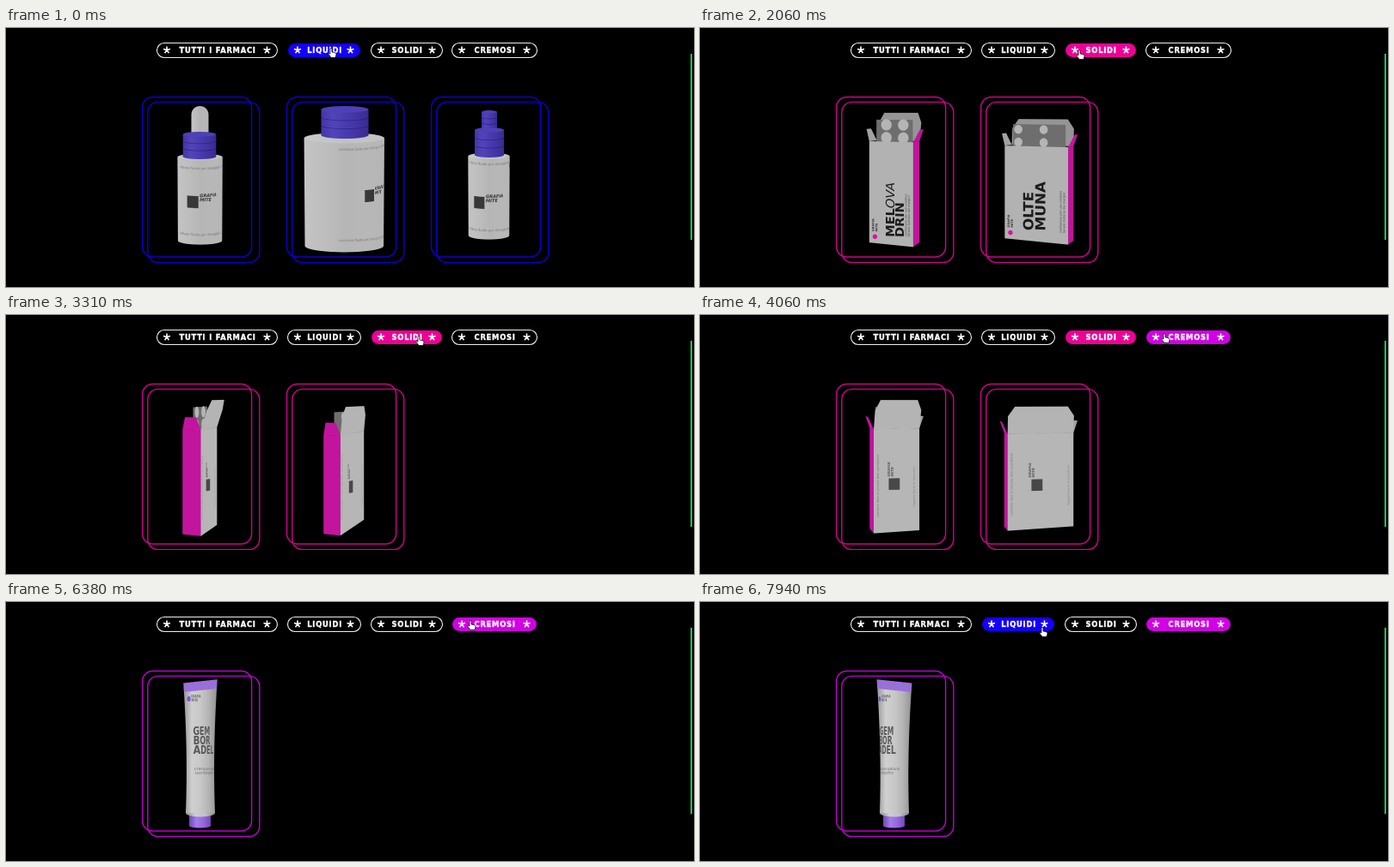
An HTML page with a canvas that plays this animation: 800 by 302 pixels, repeating every 8 s.

```html
<!DOCTYPE html>
<html lang="it">
<head>
<meta charset="utf-8">
<title>Farmaci</title>
<style>
  html, body { margin: 0; width: 100%; height: 100%; overflow: hidden; background: #000; }
  canvas, svg { position: absolute; left: 0; top: 0; width: 800px; height: 302px; }
  text { font: bold 8.4px "DejaVu Sans", sans-serif; letter-spacing: .75px; text-anchor: middle;
         fill: #fff; stroke: #fff; stroke-width: .35; }
</style>
</head>
<body>
<canvas width="1600" height="604"></canvas>
<svg viewBox="0 0 800 302"></svg>
<script>
const LOOP = 8000, STEP = 62.5, SPIN = Math.PI * .4 / 1000;
const SANS = '"DejaVu Sans", sans-serif';
const svg = document.querySelector('svg');
const ctx = document.querySelector('canvas').getContext('2d');

const tabs = [
  { name: 'TUTTI I FARMACI', x: 175.5, w: 140, color: '#fff' },
  { name: 'LIQUIDI', x: 327.5, w: 85, color: '#1400fa', line: '#0c00d2' },
  { name: 'SOLIDI', x: 424.5, w: 83, color: '#ee0096', line: '#d4008c' },
  { name: 'CREMOSI', x: 518.5, w: 99, color: '#d200e4', line: '#c000d2' }
];
// start time, selected tab, number of cards
const scenes = [[0, 1, 3], [1750, 2, 2], [5150, 3, 1]];
// time, x, y of the pointer tip
const pointerPath = [
  [0, 378, 24], [180, 378, 24], [810, 416, 25], [1250, 441, 26], [2500, 441, 26],
  [2900, 489, 25], [3310, 480, 25], [4050, 540, 22], [6650, 540, 22], [7700, 398, 30], [8000, 398, 30]
];

/* ---------- page chrome ---------- */

const star = (x, y) => {
  let d = '';
  for (let i = 0; i < 5; i++) {
    const a = i * Math.PI * .4;
    d += `M${x} ${y}l${4.2 * Math.sin(a)} ${-4.2 * Math.cos(a)}`;
  }
  return `<path d="${d}" stroke="#fff" stroke-width="1.6"/>`;
};
const tabMarkup = ({ name, x, w }) =>
  `<rect class="tab" x="${x}" y="17.5" width="${w}" height="17" rx="8.5" stroke-width="1.1"/>` +
  star(x + 11.5, 25.8) + star(x + w - 12, 25.8) +
  `<text x="${x + w / 2 + .6}" y="29">${name}</text>`;
const cardMarkup = i => `<g class="card" transform="translate(${168 * i})" fill="none" stroke-width="1.4">
  <rect x="158.6" y="80.5" width="127" height="186.5" rx="12"/>
  <rect x="164.8" y="86.4" width="130" height="187" rx="12"/></g>`;

svg.innerHTML = tabs.map(tabMarkup).join('') + [0, 1, 2].map(cardMarkup).join('') +
  `<rect x="796" y="30" width="1.7" height="217" fill="#24e266"/>
   <path id="pointer" fill="#fff" stroke="#000" stroke-width=".7"/>`;
const tabRects = svg.querySelectorAll('.tab');
const cards = svg.querySelectorAll('.card');
const pointer = svg.querySelector('#pointer');
const HAND = 'M-1 0Q0-1 1 0V4L5 5Q6 5 6 7L5 10.5H0L-3 6.5Q-3 5-1 6Z';
const ARROW = 'M0 0V8.4L2 6.6 3.4 9.6 4.8 9 3.4 6H6Z';

function pointerAt(t) {
  const i = pointerPath.findIndex(k => k[0] > t);
  const [t0, x0, y0] = pointerPath[i - 1], [t1, x1, y1] = pointerPath[i];
  const p = (t - t0) / (t1 - t0), e = p * p * (3 - 2 * p);
  return [x0 + (x1 - x0) * e, y0 + (y1 - y0) * e];
}

function drawChrome(t, selected, count) {
  const [px, py] = pointerAt(t);
  let over = false;
  tabs.forEach((tab, i) => {
    const hover = px > tab.x && px < tab.x + tab.w;
    const on = hover || i === selected;
    over = over || hover;
    tabRects[i].setAttribute('fill', on ? tab.color : '#000');
    tabRects[i].setAttribute('stroke', on ? '#000' : '#eee');
  });
  cards.forEach((card, i) => {
    card.setAttribute('visibility', i < count ? 'visible' : 'hidden');
    card.setAttribute('stroke', tabs[selected].line);
  });
  pointer.setAttribute('d', over ? HAND : ARROW);
  pointer.setAttribute('transform', `translate(${px} ${py})`);
}

/* ---------- shared drawing helpers ---------- */

function shade(cx, r, colors) {
  const g = ctx.createLinearGradient(cx - r, 0, cx + r, 0);
  colors.forEach((c, i) => g.addColorStop(i / (colors.length - 1), c));
  return g;
}
const GREY = ['#c4c4c4', '#bebebe', '#b6b6b6', '#b8b8b8', '#b6b6b6'];
const VIOLET = ['#4436a8', '#5244ba', '#4a3cb0', '#4234a2', '#382c92'];

function write(c, str, x, y, font, color) {
  c.font = `${font} ${SANS}`;
  c.fillStyle = color;
  c.fillText(str, x, y);
}
function writeUp(str, x, y, font, color) {
  ctx.save();
  ctx.translate(x, y);
  ctx.rotate(-Math.PI / 2);
  write(ctx, str, 0, 0, font, color);
  const w = ctx.measureText(str).width;
  ctx.restore();
  return w;
}
function dot(c, x, y, r, color) {
  c.beginPath();
  c.arc(x, y, r, 0, 7);
  c.fillStyle = color;
  c.fill();
}
function poly(points, fill) {
  ctx.beginPath();
  points.forEach(p => ctx.lineTo(...p));
  ctx.closePath();
  ctx.fillStyle = fill;
  ctx.fill();
}

/* ---------- bottles ---------- */

function cylinder(cx, y0, y1, r, k, colors, kTop = k, rEnd = r) {
  ctx.beginPath();
  ctx.ellipse(cx, y0, r, kTop, 0, Math.PI, Math.PI * 2);
  ctx.ellipse(cx, y1, rEnd, k, 0, 0, Math.PI);
  ctx.closePath();
  ctx.fillStyle = shade(cx, r, colors);
  ctx.fill();
}
function cap(cx, y0, y1, r, k) {
  cylinder(cx, y0, y1, r, k, VIOLET);
  ctx.beginPath();
  ctx.ellipse(cx, y0, r - .5, k - .4, 0, 0, 7);
  ctx.fillStyle = '#4e40b8';
  ctx.fill();
  ctx.strokeStyle = 'rgba(25,15,100,.6)';
  ctx.lineWidth = .7;
  for (const f of [.3, .62]) {
    ctx.beginPath();
    ctx.ellipse(cx, y0 + (y1 - y0) * f, r, k, 0, 0, Math.PI);
    ctx.stroke();
  }
}

const bottles = [
  { cx: 225.6, r: 26.2, y0: 150.5, y1: 248, k: 4, logo: [-.3, 203], ring: [165, 242], rows: ['ZEN', 'ORA', 'MIL'], rowY: 194, size: 15, dotY: 166,
    head() { cylinder(225.5, 101, 124, 10, 2, GREY, 10); cap(225, 124, 150, 19.3, 3); } },
  { cx: 393.3, r: 46.7, y0: 128.5, y1: 254, k: 6.5, logo: [.71, 197], ring: [143, 249], rows: ['FLE', 'NDA'], rowY: 194, size: 24, dotY: 160,
    head() { cap(394, 95, 125, 27.5, 4); } },
  { cx: 561.5, r: 24.2, y0: 149.5, y1: 242, k: 4, logo: [-.46, 204], ring: [160, 237], rows: ['KE', 'DUVO'], rowY: 203, size: 16, dotY: 163,
    head() { cap(562, 98, 118, 9, 2); cap(562, 119, 148, 17, 3); } }
];
const TEX = 3, LEAD = 1.5;

function makeLabel(b) {
  const tex = document.createElement('canvas');
  tex.width = Math.round(2 * Math.PI * b.r * TEX);
  tex.height = (b.y1 - b.y0) * TEX;
  const c = tex.getContext('2d');
  c.scale(TEX, TEX);
  c.translate(LEAD * b.r, -b.y0 - b.k);
  const [angle, y] = b.logo, x = angle * b.r;
  for (const ry of b.ring)
    write(c, 'contiene fluido per dosaggio grafico '.repeat(4), x - .85 * b.r, ry, '4px', '#777');
  c.fillStyle = '#383838';
  c.fillRect(x - 8, y - 7, 14, 14);
  write(c, 'GRAFIA', x + 7.5, y - 6, 'italic bold 5.2px', '#333');
  write(c, 'MITE', x + 7.5, y - .8, 'italic bold 5.2px', '#333');
  const front = (angle + 2.14) * b.r;
  b.rows.forEach((row, i) => write(c, row, front, b.rowY + i * b.size * .95, `bold ${b.size}px`, '#5c5c5c'));
  dot(c, front - 5, b.dotY, 3.7, '#4c3ce0');
  write(c, 'GRAFIA', front + 1, b.dotY - .5, 'bold 4px', '#5a4ad0');
  write(c, 'MITE', front + 1, b.dotY + 3.5, 'bold 4px', '#5a4ad0');
  return tex;
}
bottles.forEach(b => b.tex = makeLabel(b));

function drawBottle(b, t) {
  const { cx, r, y0, y1, k, tex } = b, turn = 2 * Math.PI;
  cylinder(cx, y0, y1, r, k * 1.15, GREY, k, r * .98);
  ctx.beginPath();
  ctx.ellipse(cx, y0, r - 1, k - .6, 0, 0, 7);
  ctx.fillStyle = 'rgba(208,208,208,.45)';
  ctx.fill();
  for (let x = -r; x < r; x += .5) {
    const u = Math.asin(x / r), next = Math.asin(Math.min(1, (x + .5) / r));
    const a = (u + t * SPIN + LEAD) % turn;
    ctx.drawImage(tex, (a + turn) % turn * r * TEX, 0, (next - u) * r * TEX, tex.height,
      cx + x, y0 + k * Math.cos(u), .5, y1 - y0);
  }
  b.head();
}

/* ---------- cartons ---------- */

const PINK = '#c2149c';
const cartons = [
  { cx: 226, cy: 191, w: 54, h: 118, d: 22, lid: 33, lean: 11, pills: [-10, 11], pillR: 6.6,
    front() {
      const w = writeUp('MEL', 31, 111, 'bold 14.5px', '#1c1c1c');
      writeUp('OVA', 31, 111 - w, 'italic 14.5px', '#1c1c1c');
      writeUp('DRIN', 42.5, 111, 'bold 14.5px', '#1c1c1c');
    } },
  { cx: 394, cy: 192, w: 78, h: 109, d: 20, lid: 31, lean: 3, pills: [-26, 6], pillR: 5.2,
    front() {
      writeUp('OLTE', 35, 99, 'bold 17px', '#1c1c1c');
      writeUp('MUNA', 50, 99, 'bold 17px', '#1c1c1c');
    } }
];

function drawCarton(b, t) {
  const phi = .37 + (t - 2062.5) * SPIN, s = Math.sin(phi), c = Math.cos(phi);
  const W = b.w / 2, H = b.h / 2, D = b.d / 2;
  const at = (x, y, z) => {
    const X = x * c - z * s, Z = x * s + z * c, k = 600 / (600 - Z);
    return [b.cx + X * k, b.cy + (y + Z * .16) * k];
  };
  // upright wall between two [x, z] corners, left to right as seen from outside
  const wall = (w, [x0, z0], [x1, z1], fill, paint) => {
    const p = at(x0, -H, z0), q = at(x1, -H, z1), o = at(x0, H, z0);
    poly([p, q, at(x1, H, z1), o], fill);
    if (!paint) return;
    ctx.save();
    ctx.transform((q[0] - p[0]) / w, (q[1] - p[1]) / w, (o[0] - p[0]) / b.h, (o[1] - p[1]) / b.h, ...p);
    paint();
    ctx.restore();
  };
  const sideFlap = side => () => poly([
    at(side * W, -H, -D), at(side * W, -H, D),
    at(side * (W + 6), -H - 14, D * .5), at(side * (W + 6), -H - 14, -D * .7)
  ], side * s > 0 ? PINK : '#a2a2a2');
  const lid = () => {
    const edge = [[-1, 0], [-1, .65], [-.8, 1], [.8, 1], [1, .65], [1, 0]];
    poly(edge.map(([x, f]) => at(x * W, -H - f * b.lid, -D - f * b.lean)), c < 0 ? '#b4b4b4' : '#959595');
  };
  const blister = () => {
    const x = W * .84;
    poly([at(-x, -H - 25, 0), at(x, -H - 25, 0), at(x, -H + 3, 0), at(-x, -H + 3, 0)], '#6e6e6e');
    for (const px of b.pills) for (const y of [19, 4]) {
      ctx.beginPath();
      ctx.ellipse(...at(px, -H - y, 0), b.pillR * Math.abs(c), b.pillR, 0, 0, 7);
      ctx.fillStyle = '#b5b5b5';
      ctx.fill();
    }
  };

  poly([at(-W, -H, -D), at(W, -H, -D), at(W, -H, D), at(-W, -H, D)], '#2a2a2a');
  [[-D * c, lid], [-W * s, sideFlap(-1)], [W * s, sideFlap(1)], [0, blister]]
    .sort((m, n) => m[0] - n[0]).forEach(part => part[1]());

  if (s > 0) wall(b.d, [W, D], [W, -D], PINK);
  if (s < 0) wall(b.d, [-W, -D], [-W, D], PINK);
  if (c > 0) wall(b.w, [-W, D], [W, D], '#b2b2b2', () => {
    b.front();
    dot(ctx, 7, b.h - 7, 2.8, '#e0109c');
    writeUp('GRAFIA', 6, b.h - 13, 'bold 3.6px', '#333');
    writeUp('MITE', 10, b.h - 13, 'bold 3.6px', '#333');
    writeUp('confezione per uso creativo', b.w - 8, b.h - 8, '3.6px', '#444');
    writeUp('tenere lontano dai margini', b.w - 4, b.h - 8, '3.6px', '#444');
  });
  if (c < 0) wall(b.w, [W, -D], [-W, -D], '#b6b6b6', () => {
    ctx.fillStyle = '#484848';
    ctx.fillRect(b.w * .44 - 6, b.h / 2 - 3, 13, 13);
    writeUp('GRAFIA', b.w * .36, b.h / 2 - 5, 'italic bold 4px', '#555');
    writeUp('MITE', b.w * .36 + 4, b.h / 2 - 5, 'italic bold 4px', '#555');
    writeUp('contiene idee in piccole dosi quotidiane', 6, b.h * .85, '3.6px', '#777');
    writeUp('leggere bene le istruzioni', b.w - 5, b.h * .75, '3.6px', '#888');
  });
}

/* ---------- tube ---------- */

function drawTube(t) {
  const cx = 226, top = 92.5, end = 246;
  const psi = (7165 - t) * SPIN;
  const section = y => {
    const f = Math.max(0, (y - top) / (end - top));
    return [36 - 19 * f, 1 + 16 * f];
  };
  const half = y => {
    const [a, b] = section(y);
    return Math.hypot(a * Math.cos(psi), b * Math.sin(psi));
  };
  const slope = 2.6 * Math.sin(psi) * Math.sign(Math.cos(psi));
  const side = (dir, from, to) => {
    const pts = [];
    for (let i = 0; i <= 12; i++) {
      const y = from + (to - from) * i / 12;
      pts.push([cx + dir * half(y), y - dir * slope * (end - y) / (end - top)]);
    }
    return pts;
  };
  const outline = (y0, y1) => [...side(-1, y0, y1), ...side(1, y1, y0)];

  cylinder(cx - .5, 247, 261, 12.5, 2.5, ['#6f48b0', '#a47cec', '#9468de', '#7448b8']);
  cylinder(cx, end - 1, end, 17, 4.5, ['#909090', '#cecece', '#c2c2c2', '#8c8c8c']);
  poly(outline(top, end), shade(cx, Math.max(17, half(top)), ['#969696', '#d0d0d0', '#c8c8c8', '#b4b4b4', '#909090']));
  poly(outline(top, top + 10.5), '#9870d8');

  const around = (str, x, y, font, color, angle = psi) => {
    const [a, b] = section(y), sin = Math.sin(angle), cos = Math.cos(angle);
    ctx.font = `${font} ${SANS}`;
    for (const ch of str) {
      const w = ctx.measureText(ch).width, s = (x + w / 2) / a, c = Math.sqrt(Math.max(.02, 1 - s * s));
      const squeeze = cos - s / c * b / a * sin;
      x += w;
      if (squeeze < .06 || Math.abs(s) > 1) continue;
      ctx.save();
      ctx.translate(cx + a * s * cos + b * c * sin, y);
      ctx.scale(squeeze, 1);
      write(ctx, ch, -w / 2, 0, font, color);
      ctx.restore();
    }
  };
  around('●', -31, 115, '8px', '#7c50d8');
  around('GRAFIA', -23, 111.5, 'bold 4.6px', '#666');
  around('MITE', -23, 116, 'bold 4.6px', '#666');
  ['GEM', 'BOR', 'ADEL'].forEach((row, i) => around(row, -23, 155 + i * 11, 'bold 13px', '#5a5a5a'));
  around('crema per postura', -21, 196, '4.4px', '#666');
  around('uso tipografico', -20, 200.5, '4.4px', '#666');
  around('■', -9, 180, '20px', '#484848', psi + Math.PI);
  around('GRAFIA', 4, 169, 'italic bold 4.6px', '#555', psi + Math.PI);
}

/* ---------- loop ---------- */

const start = performance.now();
function frame() {
  const now = (performance.now() - start) % LOOP;
  const t = Math.min(LOOP - STEP, Math.floor((now + 5) / STEP) * STEP);
  const [, selected, count] = scenes.filter(s => s[0] <= t).pop();
  ctx.setTransform(2, 0, 0, 2, 0, 0);
  ctx.clearRect(0, 0, 800, 302);
  if (selected === 1) bottles.forEach(b => drawBottle(b, t));
  else if (selected === 2) cartons.forEach(b => drawCarton(b, t));
  else drawTube(t);
  drawChrome(t, selected, count);
  requestAnimationFrame(frame);
}
frame();
</script>
</body>
</html>
```
